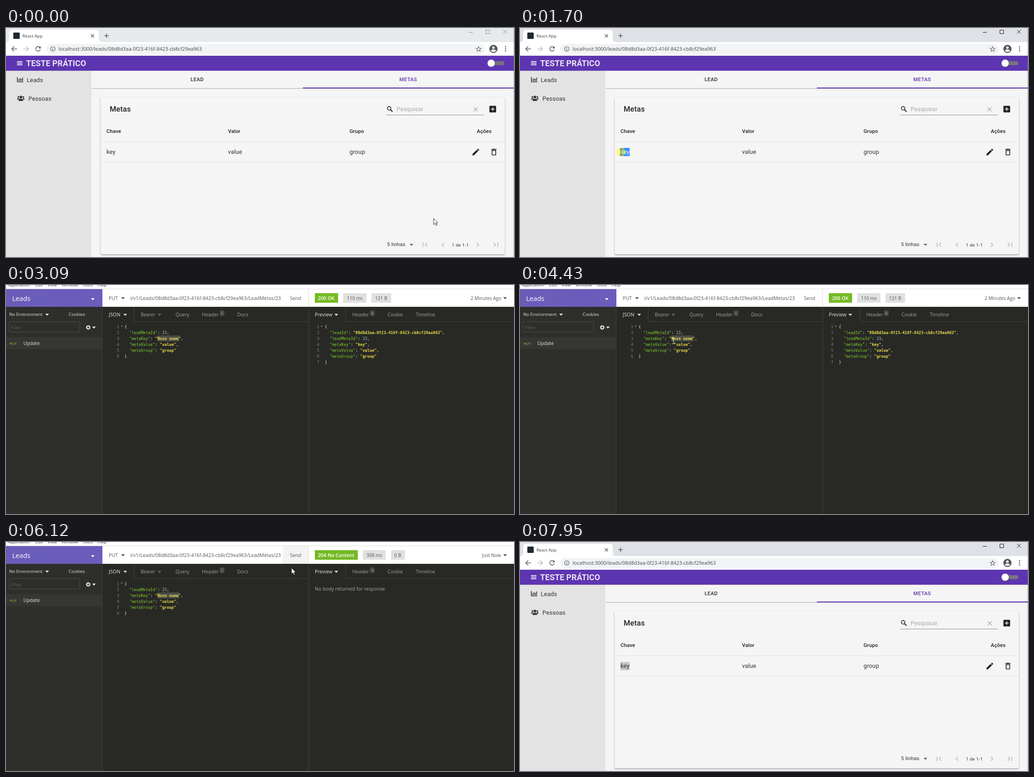
Animation, 1112 px wide and 504 px high, one loop 8000 ms. Source, as an HTML page:

```html
<!DOCTYPE html>
<html lang="pt">
<head>
<meta charset="utf-8">
<title>Teste</title>
<style>
html, body { margin: 0; width: 100%; height: 100%; overflow: hidden; background: #282925; }
svg { display: block; width: 1112px; height: 504px; }
text { white-space: pre; }

/* type */
.ui { font-family: "Open Sans", "Noto Sans", sans-serif; font-size: 10.6px; }
.rb { font-family: Roboto, sans-serif; font-size: 13px; letter-spacing: .12px; fill: #333; }
.md { font-weight: 500; font-size: 11.375px; fill: #222; }
.tab { font-weight: 500; font-size: 11.375px; letter-spacing: .325px; fill: #2d2d2d; }
.code { font: 8.54px "DejaVu Sans Mono", "Noto Sans Mono", monospace; fill: #f2f2ee; }
.k { fill: #7ecf2b; }
.s { fill: #e9dc4c; font-weight: 700; }
.n { fill: #9fbfe6; }
.num { fill: #7d7e78; text-anchor: end; }
.dim { fill: #a2a29e; }
.sb { font-weight: 600; }
.ln { fill: none; stroke: #5f6368; stroke-width: 1.6; }

/* timeline: 1% is 80 ms */
.web, .strip, .btns, .blue, .gray, .cur, .arrow, .ibeam, .halo, .hover, .before, .after, .ghost {
  animation: 8s step-end infinite;
}
.web { animation-name: web; }
.strip { animation-name: strip; }
.btns { animation-name: btns; }
.blue { animation-name: blue; }
.gray { animation-name: gray; }
.cur { animation-name: move, seen; }
.arrow { animation-name: arrow; }
.ibeam { animation-name: ibeam; }
.halo { animation-name: halo; }
.hover { animation-name: hover; }
.before { animation-name: before; }
.after { animation-name: after; }
.ghost { animation-name: ghost; }

@keyframes web { 0% { opacity: 1 } 38.625% { opacity: 0 } 99.375%, to { opacity: 1 } }
@keyframes strip { 0% { fill: #e7eaed } 14.6% { fill: #dee1e6 } 37.75% { fill: #e7eaed } 99.375%, to { fill: #dee1e6 } }
@keyframes btns { 0% { stroke: #8b8d90 } 14.6% { stroke: #111 } 37.75% { stroke: #8b8d90 } 99.375%, to { stroke: #111 } }
@keyframes blue {
  0% { opacity: 0; clip-path: inset(0 0 0 100%) }
  14.6% { opacity: 1; clip-path: inset(0 0 0 100%); animation-timing-function: steps(4, start) }
  18.4% { opacity: 1; clip-path: inset(0) }
  37.75%, to { opacity: 0; clip-path: inset(0) }
}
@keyframes gray { 0% { opacity: 0 } 37.75%, to { opacity: 1 } }
@keyframes seen { 0% { opacity: 1 } 33.75% { opacity: 0 } 42.625% { opacity: 1 } 94.625%, to { opacity: 0 } }
@keyframes arrow { 0% { opacity: 1 } 13.65% { opacity: 0 } 24.125% { opacity: 1 } 45.5% { opacity: 0 } 64.9%, to { opacity: 1 } }
@keyframes ibeam {
  0% { opacity: 0; stroke: #333 } 13.65% { opacity: 1; stroke: #333 } 24.125% { opacity: 0; stroke: #333 }
  45.5% { opacity: 1; stroke: #eee } 64.9%, to { opacity: 0; stroke: #eee }
}
@keyframes halo { 0% { opacity: 0 } 14.6% { opacity: 1 } 24.125%, to { opacity: 0 } }
@keyframes hover { 0% { opacity: 0 } 67.75% { opacity: 1 } 77.36%, to { opacity: 0 } }
@keyframes before { 0% { opacity: 1 } 74.5%, to { opacity: 0 } }
@keyframes after { 0% { opacity: 0 } 74.5%, to { opacity: 1 } }
@keyframes ghost { 0% { opacity: 0 } 77.36%, to { opacity: 1 } }
@keyframes move {
  0% { transform: translate(936px, 419px) }
  .875% { transform: translate(936px, 419px); animation-timing-function: steps(4, start) }
  4.7125% { transform: translate(397px, 268px) }
  5.875% { transform: translate(397px, 268px); animation-timing-function: steps(5, start) }
  10.5625% { transform: translate(289px, 273px) }
  11.75% { transform: translate(289px, 273px); animation-timing-function: steps(3, start) }
  14.6% { transform: translate(243px, 273px); animation-timing-function: steps(4, start) }
  18.4% { transform: translate(221px, 273px) }
  24.125% { transform: translate(221px, 273px); animation-timing-function: steps(11, start) }
  34.7125% { transform: translate(721px, 512px) }
  42.625% { transform: translate(690px, 401px) }
  43.5825% { transform: translate(690px, 401px); animation-timing-function: steps(3, start) }
  46.4625% { transform: translate(614px, 197px) }
  47.625% { transform: translate(614px, 197px); animation-timing-function: steps(4, start) }
  51.625% { transform: translate(344px, 137px) }
  52.5% { transform: translate(344px, 137px); animation-timing-function: steps(4, start) }
  56.3% { transform: translate(336px, 123px); animation-timing-function: steps(7, start) }
  62.95% { transform: translate(504px, 113px) }
  63% { transform: translate(504px, 113px); animation-timing-function: steps(7, start) }
  69.7125% { transform: translate(632px, 23px) }
  70.625% { transform: translate(632px, 23px); animation-timing-function: steps(3, start) }
  73.5125% { transform: translate(625px, 57px) }
  77.3625% { transform: translate(625px, 57px); animation-timing-function: steps(4, start) }
  81.2125% { transform: translate(708px, 64px) }
  81.25% { transform: translate(708px, 64px); animation-timing-function: steps(5, start) }
  86.0625% { transform: translate(850px, 120px); animation-timing-function: steps(6, start) }
  91.7% { transform: translate(720px, 337px) }
  91.75% { transform: translate(720px, 337px); animation-timing-function: steps(4, start) }
  95.5875%, to { transform: translate(640px, 536px) }
}
</style>
</head>
<body>
<svg viewBox="0 0 1112 504">
<defs>
  <path id="ptr" d="M0 0V13.6L3.2 10.6 5.4 15.6 7.5 14.7 5.3 9.8H9.4Z"/>
  <path id="down" d="M-4-2H4L0 2.4Z"/>
  <path id="fold" d="M-2-1.4H2L0 1.4Z" fill="#85867f"/>
  <linearGradient id="purple"><stop stop-color="#6a5db8"/><stop offset="1" stop-color="#6c5cbd"/></linearGradient>
  <linearGradient id="drop" x2="0" y2="1"><stop stop-opacity=".2"/><stop offset="1" stop-opacity="0"/></linearGradient>
  <filter id="soft" x="-5%" y="-5%" width="110%" height="112%"><feGaussianBlur stdDeviation="1.6"/></filter>
</defs>

<!-- API client -->
<g class="ui" fill="#e6e6e3">
  <rect width="1112" height="504" fill="#282925"/>
  <rect width="210" height="504" fill="#2e2f2b"/>
  <rect width="1112" height="48" fill="#fff"/>
  <rect y="8" width="1112" height="1" fill="#dcdcdc"/>
  <g fill="#333" font-size="9.4">
    <text x="4" y="3">Application</text><text x="64" y="3">Edit</text><text x="91" y="3">View</text>
    <text x="122" y="3">Window</text><text x="167" y="3">Tools</text><text x="200" y="3">Help</text>
  </g>
  <rect y="9" width="211" height="39" fill="url(#purple)"/>
  <text x="13.5" y="35" font-size="14.7" fill="#fff">Leads</text>
  <use href="#down" x="190" y="31" fill="#fff"/>

  <text x="7" y="68.3" font-size="9.6">No Environment</text>
  <use href="#down" x="90" y="65"/>
  <text x="137" y="68.3" font-size="9.8">Cookies</text>
  <rect x="6.5" y="80.5" width="155" height="23" rx="2.5" fill="none" stroke="#4d4e4a"/>
  <text x="11" y="97" font-size="9.8" fill="#5d5e59">Filter</text>
  <circle cx="180" cy="93.5" r="4.7"/>
  <path d="M177.3 93.5h5.4M180 90.8v5.4" stroke="#2e2f2b" stroke-width="1.5"/>
  <use href="#down" x="192.500" y="93.500"/>
  <rect y="115" width="210" height="26" fill="#363733"/>
  <text x="8" y="131.5" font-size="8" fill="#c9bd3f">PUT</text>
  <text x="38" y="132" font-size="10.5">Update</text>

  <g fill="#555">
    <text x="225" y="33">PUT</text>
    <use href="#down" x="256" y="29"/>
    <text x="272" y="33" font-size="10.68">i/v1/Leads/08d8d3aa-0f23-416f-8423-cb8cf29ea963/LeadMetas/23</text>
    <rect class="hover" x="606" y="9" width="56" height="39" fill="#f3f3f3"/>
    <text x="621.500" y="33">Send</text>
  </g>

  <g fill="none" stroke="#43443f">
    <path d="M210.500 48V504M662.500 48V504M280.500 48V80.500H662M743.500 48V80.500H1112"/>
    <path d="M662.500 9V48" stroke="#ddd"/>
  </g>
  <text x="225" y="69.300" font-size="10.800">JSON</text><use href="#down" x="261" y="65.500"/>
  <g class="dim">
    <text x="295" y="69.300" font-size="10.200">Bearer</text><use href="#down" x="336" y="65.500" opacity=".55"/>
    <text x="371" y="69.300">Query</text><text x="429" y="69.300">Header</text>
    <text x="506" y="69.300" font-size="10.800">Docs</text>
    <text x="758" y="69.300">Header</text><text x="835" y="69.300">Cookie</text><text x="897" y="69.300">Timeline</text>
    <g fill="#4b4c48"><rect x="468" y="56" width="10" height="12" rx="2"/><rect x="797" y="56" width="10" height="12" rx="2"/></g>
    <text x="470.500" y="65" font-size="8">1</text>
  </g>
  <text x="676" y="69.300" font-size="10.700">Preview</text><use href="#down" x="723" y="65.500"/>

  <g class="code">
    <rect x="331.500" y="111" width="48" height="13" fill="#4d4d48"/>
    <g class="num">
      <text x="248" y="94.500">1</text><text x="248" y="107.500">2</text><text x="248" y="120.500">3</text>
      <text x="248" y="133.500">4</text><text x="248" y="146.500">5</text><text x="248" y="159.500">6</text>
    </g>
    <use href="#fold" x="253.500" y="91"/>
    <text x="259.500" y="94.500">{</text>
    <text x="269.800" y="107.500"><tspan class="k">"leadMetaId"</tspan>: <tspan class="n">23</tspan>,</text>
    <text x="269.800" y="120.500"><tspan class="k">"metaKey"</tspan>: <tspan class="s">"Novo nome"</tspan>,</text>
    <text x="269.800" y="133.500"><tspan class="k">"metaValue"</tspan>: <tspan class="s">"value"</tspan>,</text>
    <text x="269.800" y="146.500"><tspan class="k">"metaGroup"</tspan>: <tspan class="s">"group"</tspan></text>
    <text x="259.500" y="159.500">}</text>
  </g>

  <g class="before">
    <rect x="676" y="18" width="51" height="21" fill="#75ba24"/>
    <path d="M738 18h51v21h-51zM800 18h43v21h-43z" fill="#e0e0e0"/>
    <text class="sb" x="683" y="32.800" fill="#fff">200 OK</text>
    <g fill="#555" font-size="10.100">
      <text x="746.500" y="32.800">110 ms</text><text x="808" y="32.800">121 B</text><text x="1017" y="32.800">2 Minutes Ago</text>
    </g>
    <text class="dim" x="799.500" y="65" font-size="8">6</text>
    <g class="code">
      <g class="num">
        <text x="686" y="94.500">1</text><text x="686" y="107.500">2</text><text x="686" y="120.500">3</text>
        <text x="686" y="133.500">4</text><text x="686" y="146.500">5</text><text x="686" y="159.500">6</text>
        <text x="686" y="172.500">7</text>
      </g>
      <use href="#fold" x="691" y="91"/>
      <text x="698" y="94.500">{</text>
      <text x="708.500" y="107.500"><tspan class="k">"leadId"</tspan>: <tspan class="s">"08d8d3aa-0f23-416f-8423-cb8cf29ea963"</tspan>,</text>
      <text x="708.500" y="120.500"><tspan class="k">"leadMetaId"</tspan>: <tspan class="n">23</tspan>,</text>
      <text x="708.500" y="133.500"><tspan class="k">"metaKey"</tspan>: <tspan class="s">"key"</tspan>,</text>
      <text x="708.500" y="146.500"><tspan class="k">"metaValue"</tspan>: <tspan class="s">"value"</tspan>,</text>
      <text x="708.500" y="159.500"><tspan class="k">"metaGroup"</tspan>: <tspan class="s">"group"</tspan></text>
      <text x="698" y="172.500">}</text>
    </g>
  </g>

  <g class="after">
    <rect x="676" y="18" width="94" height="21" fill="#75ba24"/>
    <path d="M781 18h50v21h-50zM843 18h30v21h-30z" fill="#e0e0e0"/>
    <text class="sb" x="683" y="32.800" fill="#fff">204 No Content</text>
    <g fill="#555" font-size="10.100">
      <text x="789" y="32.800">308 ms</text><text x="850" y="32.800">0 B</text><text x="1042" y="32.800">Just Now</text>
    </g>
    <text class="dim" x="799.500" y="65" font-size="8">4</text>
    <text x="676" y="106.800" fill="#a9a9a5">No body returned for response</text>
  </g>
  <use href="#down" x="1092.500" y="29" fill="#555"/>
  <use class="ghost" href="#ptr" x="625" y="57" fill="#53544f"/>
</g>

<!-- browser -->
<g class="web">
  <rect width="1112" height="504" fill="#f5f5f5"/>
  <rect class="strip" width="1112" height="31" fill="#e7eaed"/>
  <path d="M0 31Q7 31 7 24V11Q7 4 14 4H196Q203 4 203 11V24Q203 31 210 31V61H0Z" fill="#fff"/>
  <rect y="31" width="1112" height="30" fill="#fff"/>
  <rect x="16" y="10" width="14" height="14" rx="1.500" fill="#20292f"/>
  <text class="ui" x="36" y="20.500" font-size="9.400" style="font-size:9.4px" fill="#3c4043">React App</text>
  <path class="ln" d="M186 14l6.500 6.500M192.500 14L186 20.500" stroke-width="1.300"/>
  <path class="ln" d="M220 12v10M215 17h10"/>
  <g class="btns" fill="none" stroke="#8b8d90"><path d="M1013 9.500h9M1050.500 4.500h8v8h-8zM1088 4l8.500 8.500M1096.500 4L1088 12.500"/></g>

  <rect x="88" y="35" width="960" height="22" rx="11" fill="#f1f3f4"/>
  <path class="ln" d="M24 46H13M18 40.500L12.500 46 18 51.500"/>
  <path class="ln" d="M38 46H49M44 40.500L49.500 46 44 51.500" style="stroke:#bbbdc0"/>
  <path class="ln" d="M74.200 42.800A5 5 0 1 0 75 47.500"/><path d="M76 40v5h-5z" fill="#5f6368"/>
  <circle class="ln" cx="102.500" cy="46" r="5" style="stroke-width:1.2"/>
  <path class="ln" d="M102.500 45.300V49M102.500 43v1.300" style="stroke-width:1.3"/>
  <text class="ui" x="115" y="49.800" style="font-size:10.950px" fill="#45484c">localhost<tspan>:3000/leads/08d8d3aa-0f23-416f-8423-cb8cf29ea963</tspan></text>
  <path class="ln" d="M1034.500 41l1.500 3.600 3.900.300-3 2.500 1 3.800-3.400-2.100-3.400 2.100 1-3.800-3-2.500 3.900-.300z" style="stroke-width:1.1"/>
  <circle cx="1067" cy="46" r="9" fill="#54575c"/>
  <g fill="#fff"><circle cx="1067" cy="43.200" r="2.700"/><path d="M1061.300 50.200c1-4 10.400-4 11.400 0-2.600 3.200-8.800 3.200-11.400 0z"/></g>
  <g fill="#5f6368"><circle cx="1093.500" cy="41.500" r="1.400"/><circle cx="1093.500" cy="46" r="1.400"/><circle cx="1093.500" cy="50.500" r="1.400"/></g>

  <rect y="94" width="187" height="410" fill="#e3e3e3"/>
  <rect y="61" width="1112" height="33" fill="#5e35b1"/>
  <path d="M24 74h12M24 77.500h12M24 81h12" stroke="#e6e0f2" stroke-width="1.800"/>
  <text class="rb" x="44" y="84" style="font-size:17.800px;font-weight:700;letter-spacing:0;fill:#e8e2f4">TESTE PRÁTICO</text>
  <rect x="1060" y="73" width="31" height="9" rx="4.500" fill="#77737d"/>
  <circle cx="1062.500" cy="78.300" r="8.200" opacity=".25"/>
  <circle cx="1062" cy="77.500" r="8" fill="#fff"/>

  <g fill="none" stroke="#333"><path d="M25 108v10.500h13" stroke-width="1.700"/><path d="M28.300 112.500v4M31 110.500v6M33.700 112v4.500M36.400 109v7.500" stroke-width="1.600"/></g>
  <text class="rb" x="45.500" y="119">Leads</text>
  <g fill="#333">
    <circle cx="32.500" cy="152" r="2.900"/><circle cx="27" cy="151.800" r="1.800"/><circle cx="38" cy="151.800" r="1.800"/>
    <path d="M27.500 160.500v-1.500q0-3 3-3h4q3 0 3 3v1.500zM24.500 157.500v-1.300q0-2 2-2h2q.700 0 .800.600-2 .900-2.200 2.700zM40.500 157.500v-1.300q0-2-2-2h-2q-.700 0-.800.600 2 .900 2.200 2.700z"/>
  </g>
  <text class="rb" x="49" y="160">Pessoas</text>

  <rect x="188" y="132.500" width="924" height="1" fill="#a2a2a2"/>
  <rect x="650" y="131" width="462" height="2" fill="#5e35b1"/>
  <text class="rb tab" x="404" y="117">LEAD</text>
  <text class="rb tab" x="861" y="117" style="fill:#5e35b1">METAS</text>

  <rect x="207" y="153.500" width="885" height="346" rx="3" fill="#000" opacity=".38" filter="url(#soft)"/>
  <rect x="207" y="152" width="885" height="346" rx="3" fill="#f5f5f5"/>
  <text class="rb" x="227" y="184.300" style="font-size:16.250px;font-weight:500;fill:#222">Metas</text>
  <text class="rb" x="855" y="182.700" style="fill:#a9a9a9">Pesquisar</text>
  <rect x="832" y="191" width="214" height="1" fill="#8b8b8b"/>
  <g fill="none" stroke="#222"><circle cx="838.700" cy="176.800" r="3.900" stroke-width="1.600"/><path d="M841.600 179.700l4.600 4.600" stroke-width="2"/></g>
  <path d="M1023.500 174.500l9 9M1032.500 174.500l-9 9" stroke="#a9a9a9" stroke-width="1.300"/>
  <g fill="#222">
    <path transform="translate(1055.750 168.750) scale(.8125)" d="M19 3H5c-1.110 0-2 .9-2 2v14c0 1.100.89 2 2 2h14c1.100 0 2-.9 2-2V5c0-1.100-.9-2-2-2zm-2 10h-4v4h-2v-4H7v-2h4V7h2v4h4v2z"/>
    <path transform="translate(1018.750 263.250) scale(.8125)" d="M3 17.250V21h3.750L17.810 9.940l-3.750-3.750L3 17.250zM20.710 7.040c.39-.39.39-1.020 0-1.410l-2.340-2.340c-.39-.39-1.020-.39-1.410 0l-1.830 1.830 3.750 3.750 1.830-1.830z"/>
    <path transform="translate(1058.250 263.250) scale(.8125)" d="M6 19c0 1.100.9 2 2 2h8c1.100 0 2-.9 2-2V7H6v12zM8 9h8v10H8V9zm7.500-5l-1-1h-5l-1 1H5v2h14V4z"/>
  </g>
  <text class="rb md" x="220" y="231">Chave</text><text class="rb md" x="486" y="231">Valor</text>
  <text class="rb md" x="752" y="231">Grupo</text><text class="rb md" x="1030.500" y="231">Ações</text>
  <path d="M207 250.500H1092M207 295.500H1092" stroke="#e0e0e0"/>
  <rect class="gray" x="220" y="264" width="20" height="18" fill="#c4c4c4"/>
  <text class="rb" x="220" y="277.300">key</text><text class="rb" x="486" y="277.300">value</text><text class="rb" x="752" y="277.300">group</text>
  <g class="blue"><rect x="220" y="264" width="20" height="18" fill="#3390ff"/><text class="rb" x="220" y="277.300" style="fill:#fff">key</text></g>

  <text class="rb" x="834" y="480" style="font-size:11.375px">5 linhas</text>
  <use href="#down" x="887.500" y="477" fill="#666"/>
  <text class="rb" x="976" y="480.500" style="font-size:9.750px;letter-spacing:.320px">1 de 1-1</text>
  <path d="M913 472v10M922 472.500l-4.500 4.500 4.500 4.500M959 472.500l-4.500 4.500 4.500 4.500M1030.500 472.500l4.500 4.500-4.500 4.500M1067.500 472.500l4.500 4.500-4.500 4.500M1076.500 472v10" fill="none" stroke="#b5b5b5" stroke-width="1.500"/>
  <rect y="94" width="1112" height="3" fill="url(#drop)" opacity=".3"/>
  <rect x="1111" width="1" height="504" fill="#8d8f92" opacity=".6"/>
</g>

<!-- pointer -->
<g class="cur">
  <circle class="halo" r="10" fill="#ff0" fill-opacity=".45"/>
  <use class="arrow" href="#ptr" fill="#fff" stroke="#111" stroke-width=".900"/>
  <path class="ibeam" d="M-3-6.500h2L0-5.500 1-6.500h2M0-5.500V5.500M-3 6.500h2L0 5.500 1 6.500h2" fill="none"/>
</g>
</svg>
</body>
</html>
```
